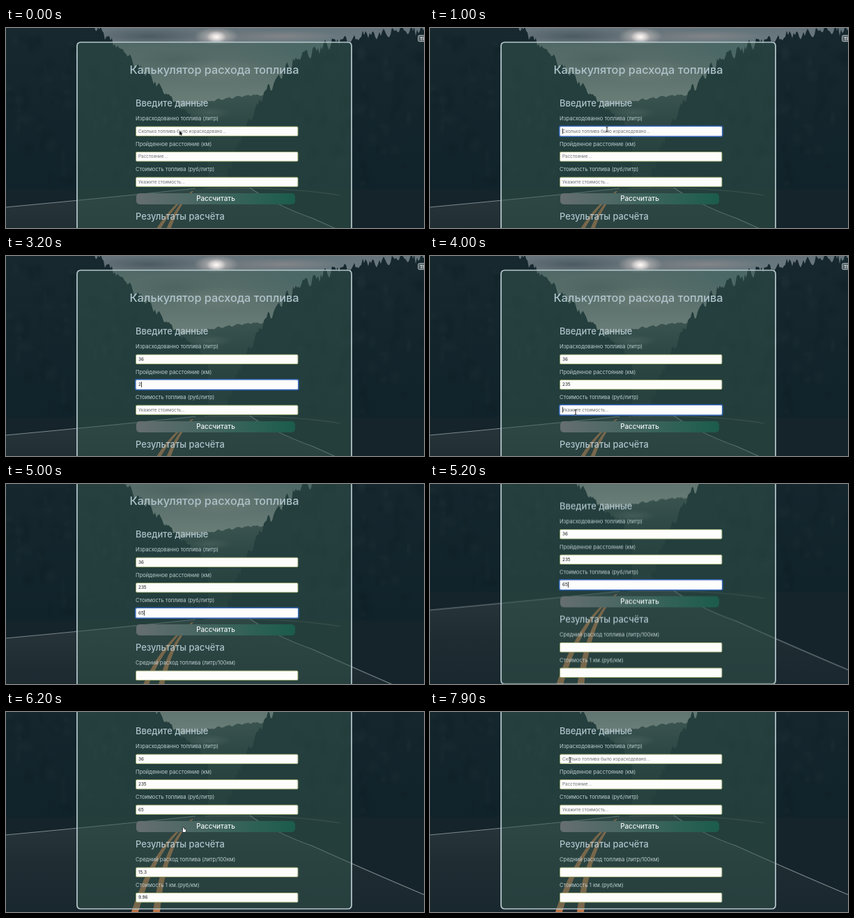
An HTML page with a canvas for the animation above (8 s loop, 600 by 288 pixels).

```html
<!DOCTYPE html>
<html lang="ru">
<head>
<meta charset="utf-8">
<title>Калькулятор расхода топлива</title>
<style>
html, body { margin: 0; width: 100%; height: 100%; overflow: hidden; background: #15262b; }
canvas { display: block; width: 600px; height: 288px; }
</style>
</head>
<body>
<canvas id="stage" width="600" height="288"></canvas>
<script>
const W = 600, H = 288, PAGE_H = 369, MAX_SCROLL = PAGE_H - H;
const LOOP = 8000, STEP = 100;
const KEY_DELAY = 700, KEY_GAP = 200, BLINK = 600, TRAVEL = 300;
const SCROLL_AT = 4900, SCROLL_TIME = 393, CALC_AT = 6100, RELOAD_AT = 7200;
const FONT = 'Inter, "Open Sans", sans-serif';
const TREE_TOP = '#17292f', TREE_BASE = '#11232a';

const ctx = document.getElementById('stage').getContext('2d');

const fuel = 36, distance = 235, price = 65;
const inputs = [
  { label: 'Израсходованно топлива (литр)', hint: 'Сколько топлива было израсходовано...', value: fuel, focusAt: 1000 },
  { label: 'Пройденное расстояние (км)', hint: 'Расстояние...', value: distance, focusAt: 2500 },
  { label: 'Стоимость топлива (руб/литр)', hint: 'Укажите стоимость...', value: price, focusAt: 3900 }
];
const results = [
  { label: 'Средний расход топлива (литр/100км)', value: (fuel / distance * 100).toFixed(1) },
  { label: 'Стоимость 1 км.(руб/км)', value: (fuel * price / distance).toFixed(2) }
];
inputs.forEach((f, i) => {
  f.y = 148.5 + 36.5 * i;
  f.blurAt = i < 2 ? inputs[i + 1].focusAt : CALC_AT;
});
results.forEach((f, i) => f.y = 311.5 + 36.5 * i);
const fields = [...inputs, ...results];
const button = { x: 187, y: 238, w: 228, h: 16 };

// arrival times and resting points of the pointer, in stage coordinates
const stops = [
  { at: 0, x: 249, y: 148 },
  { at: 900, x: 254, y: 146 },
  { at: 2400, x: 214, y: 185 },
  { at: 3900, x: 209, y: 225 },
  { at: 6000, x: 255, y: 169 },
  { at: 7900, x: 201, y: 69 }
];

const clamp = v => Math.max(0, Math.min(1, v));
const smooth = p => p * p * (3 - 2 * p);
const mix = (a, b, p) => a + (b - a) * p;

function seeded(seed) {
  return () => (seed = (seed * 16807) % 2147483647) / 2147483647;
}

function fade(c, y0, y1, ...colors) {
  const g = c.createLinearGradient(0, y0, 0, y1);
  colors.forEach((color, i) => g.addColorStop(i / (colors.length - 1), color));
  return g;
}

function fillPath(c, fill, draw) {
  c.beginPath();
  draw(c);
  c.closePath();
  c.fillStyle = fill;
  c.fill();
}

function strokePath(c, color, width, draw) {
  c.beginPath();
  draw(c);
  c.strokeStyle = color;
  c.lineWidth = width;
  c.stroke();
}

function panel(c, x, y, w, h, r, fill, border, width = 1) {
  c.beginPath();
  c.roundRect(x, y, w, h, r);
  c.fillStyle = fill;
  c.fill();
  if (border) {
    c.strokeStyle = border;
    c.lineWidth = width;
    c.stroke();
  }
}

function glow(c, x, y, rx, ry, rgb, alpha) {
  c.save();
  c.translate(x, y);
  c.scale(rx, ry);
  const g = c.createRadialGradient(0, 0, 0, 0, 0, 1);
  g.addColorStop(0, `rgba(${rgb},${alpha})`);
  g.addColorStop(1, `rgba(${rgb},0)`);
  c.fillStyle = g;
  c.fillRect(-1, -1, 2, 2);
  c.restore();
}

function text(c, str, x, y, size, color, weight = 400, align = 'left') {
  c.font = `${weight} ${size}px ${FONT}`;
  c.textAlign = align;
  c.fillStyle = color;
  c.fillText(str, x, y);
}

const leftTrees = x => (x - 132) * 0.95;
const rightTrees = x => 130 * Math.exp((350 - x) / 65);
const farHills = x => 105 - 9 * Math.sin((x - 295) / 48);

// Fills everything below a skyline, roughened into foliage
function woods(c, skyline, x0, x1, rough, fill, rnd) {
  fillPath(c, fill, p => {
    p.moveTo(x0, 236);
    for (let x = x0; x <= x1; x += 2) {
      p.lineTo(x, skyline(x) + rough * (Math.sin(x * 0.45) * 0.4 + rnd() - 0.5));
    }
    p.lineTo(x1, 236);
  });
}

function drawSky(c) {
  c.fillStyle = fade(c, 0, 110, '#65737a', '#7d8587', '#a3a6a4');
  c.fillRect(0, 0, W, 240);
  glow(c, 205, 12, 85, 13, '62,78,86', 0.7);
  glow(c, 240, 45, 60, 16, '96,106,110', 0.7);
  glow(c, 430, 30, 100, 45, '92,118,124', 0.8);
  glow(c, 400, 12, 85, 9, '160,145,148', 0.5);
  glow(c, 305, 62, 75, 18, '190,178,172', 0.5);
  glow(c, 302, 12, 32, 13, '240,224,220', 0.7);
  glow(c, 302, 13, 14, 9, '255,250,248', 1);
}

function leftLine(p) {
  p.moveTo(0, 258);
  p.quadraticCurveTo(150, 244, 272, 231);
}

function rightLine(p) {
  p.moveTo(350, 230);
  p.bezierCurveTo(365, 241, 400, 260, 440, 274);
  p.quadraticCurveTo(515, 308, 600, 344);
}

function drawRoad(c) {
  c.fillStyle = '#14242a';
  c.fillRect(0, 232, W, PAGE_H - 232);
  fillPath(c, fade(c, 229, PAGE_H, '#2a363b', '#1f2d33', '#19272e'), p => {
    leftLine(p);
    p.lineTo(350, 230);
    p.bezierCurveTo(365, 241, 400, 260, 440, 274);
    p.quadraticCurveTo(515, 308, 600, 344);
    p.lineTo(W, PAGE_H);
    p.lineTo(0, PAGE_H);
  });
  strokePath(c, 'rgba(120,122,118,.45)', 1.2, p => {
    p.moveTo(285, 231);
    p.quadraticCurveTo(400, 228, 480, 241);
  });
  strokePath(c, '#7d8a8e', 1, leftLine);
  strokePath(c, '#7d8a8e', 1.1, rightLine);
  for (const foot of [180, 211]) {
    const bend = foot * 0.4 + 139;
    fillPath(c, '#bd7648', p => {
      p.moveTo(267, 235);
      p.quadraticCurveTo(bend, 272, foot, PAGE_H);
      p.lineTo(foot + 10, PAGE_H);
      p.quadraticCurveTo(bend + 6, 272, 269, 235);
    });
  }
}

function drawLandscape(c) {
  const rnd = seeded(77);
  drawSky(c);
  c.filter = 'blur(0.5px)';
  woods(c, farHills, 190, 420, 2, fade(c, 95, 180, '#414f52', '#26383c', '#1c2d32'), rnd);
  glow(c, 292, 122, 34, 9, '120,130,128', 0.5);
  const bark = fade(c, 0, 232, TREE_TOP, TREE_BASE);
  woods(c, leftTrees, 0, 290, 9, bark, rnd);
  woods(c, rightTrees, 318, W, 12, bark, rnd);
  for (let i = 0; i < 160; i++) {
    const side = rnd() < 0.5;
    const x = (side ? 0 : 410) + rnd() * 190;
    const top = side ? Math.max(0, leftTrees(x)) : rightTrees(x);
    glow(c, x, mix(top + 14, 225, rnd()), 4 + rnd() * 9, 5 + rnd() * 12, rnd() < 0.5 ? '6,18,24' : '50,70,70', 0.13);
  }
  drawRoad(c);
  c.filter = 'none';
}

function drawPage(c) {
  drawLandscape(c);
  panel(c, 102, 20.5, 394, 344, 5, 'rgba(52,88,78,.5)', '#b9cad0', 1.7);
  panel(c, 591.5, 10.5, 20, 9, 2, '#59666b', '#b9c2c4', 0.8);
  text(c, 'ТГ', 594, 17.5, 6.5, '#e4e9ea', 600);

  const ink = '#afc3cb';
  text(c, 'Калькулятор расхода топлива', 299, 66, 16.3, ink, 500, 'center');
  text(c, 'Введите данные', 186, 112.5, 12.9, ink, 500);
  text(c, 'Результаты расчёта', 186, 276, 12.9, ink, 500);
  fields.forEach(f => text(c, f.label, 186, f.y - 15.5, 7.6, '#bfcfd2'));

  const g = c.createLinearGradient(button.x, 0, button.x + button.w, 0);
  g.addColorStop(0, '#666e71');
  g.addColorStop(1, '#1b5c4c');
  panel(c, button.x, button.y, button.w, button.h, 5, g);
  text(c, 'Рассчитать', 301, 249, 9.9, '#eef3f3', 500, 'center');
}

const firstKey = f => f.focusAt + KEY_DELAY;

function valueAt(f, t) {
  if (t >= RELOAD_AT) return '';
  if (!f.focusAt) return t >= CALC_AT ? f.value : '';
  const count = Math.floor((t - firstKey(f)) / KEY_GAP) + 1;
  return String(f.value).slice(0, Math.max(0, count));
}

function drawField(f, t) {
  const focused = t >= f.focusAt && t < f.blurAt;
  const value = valueAt(f, t);
  panel(ctx, 186.5, f.y - 6.5, 232.5, 13.5, 1.5, '#fdfdfc', focused ? '#e6edf6' : '#96a468', 0.9);
  if (focused) {
    ctx.beginPath();
    ctx.roundRect(185.7, f.y - 7.3, 234.2, 15, 2);
    ctx.strokeStyle = '#3465b5';
    ctx.lineWidth = 1.5;
    ctx.stroke();
  }
  text(ctx, value || f.hint || '', 190, f.y + 2.3, 6.4, value ? '#17191a' : '#6c7072');
  if (!focused) return;
  const lastKey = firstKey(f) + KEY_GAP * (value.length - 1);
  const since = t - (value ? lastKey : f.focusAt);
  if (Math.floor(since / BLINK) % 2 === 0) {
    const x = value ? 190.2 + ctx.measureText(value).width : 190;
    ctx.fillStyle = '#111';
    ctx.fillRect(x, f.y - 4, 0.8, 8);
  }
}

function drawArrow() {
  const shape = p => {
    p.moveTo(0, 0);
    p.lineTo(0, 6.4);
    p.lineTo(1.6, 5);
    p.lineTo(2.8, 7.4);
    p.lineTo(3.6, 7);
    p.lineTo(2.6, 4.8);
    p.lineTo(4.6, 4.7);
    p.closePath();
  };
  strokePath(ctx, '#fff', 1, shape);
  fillPath(ctx, '#080808', shape);
}

function drawBeam() {
  const shape = p => {
    for (const end of [-3.6, 3.6]) {
      p.moveTo(-1.6, end);
      p.quadraticCurveTo(0, end, 0, end * 0.75);
      p.quadraticCurveTo(0, end, 1.6, end);
    }
    p.moveTo(0, -2.8);
    p.lineTo(0, 2.8);
  };
  strokePath(ctx, 'rgba(255,255,255,.6)', 1.6, shape);
  strokePath(ctx, '#111', 0.9, shape);
}

function drawHand() {
  const shape = p => {
    p.roundRect(-0.9, -2.8, 1.6, 4.5, 0.8);
    p.roundRect(-1.4, 0, 4.6, 4, 1.4);
  };
  strokePath(ctx, '#111', 1.2, shape);
  fillPath(ctx, '#fff', shape);
}

function drawPointer(t, scroll) {
  const i = stops.findLastIndex(s => s.at <= t);
  const from = stops[i], to = stops[i + 1] || from;
  const leaving = to.at - TRAVEL;
  const typing = inputs.some(f => t >= firstKey(f) && t < f.blurAt);
  if (typing && t < leaving) return;

  const p = smooth(clamp((t - leaving) / TRAVEL));
  const x = mix(from.x, to.x, p), y = mix(from.y, to.y, p), pageY = y + scroll;
  const overField = t >= TRAVEL && fields.some(f => Math.abs(pageY - f.y) < 8);
  const overButton = pageY > button.y && pageY < button.y + button.h;
  ctx.save();
  ctx.translate(x, y);
  if (overButton) drawHand();
  else if (overField) drawBeam();
  else drawArrow();
  ctx.restore();
}

const page = document.createElement('canvas');
page.width = W;
page.height = PAGE_H;
drawPage(page.getContext('2d'));

function render(t) {
  const left = 1 - clamp((t - SCROLL_AT) / SCROLL_TIME);
  const scroll = MAX_SCROLL * (1 - left * left);
  ctx.save();
  ctx.translate(0, -scroll);
  ctx.drawImage(page, 0, 0);
  fields.forEach(f => drawField(f, t));
  ctx.restore();
  drawPointer(t, scroll);
}

const start = performance.now();
function tick() {
  const t = (performance.now() - start) % LOOP;
  render(Math.floor(t / STEP) * STEP);
  requestAnimationFrame(tick);
}
tick();
</script>
</body>
</html>
```
